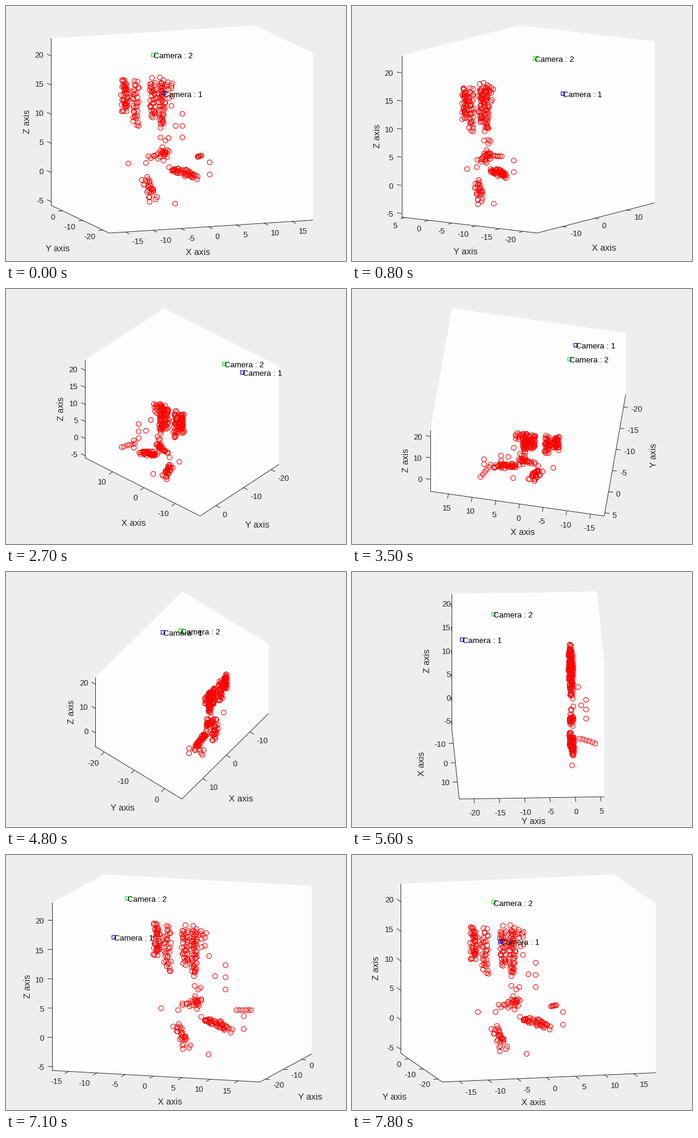
Animation of 560 by 420 pixels, one loop 7900 ms. Source, as a matplotlib script:

```python
import numpy as np
import matplotlib.pyplot as plt
from matplotlib.animation import FuncAnimation

W, H, DPI = 560, 420, 100
FRAMES, INTERVAL = 79, 100
PT = 72 / DPI  # points per pixel
INK = "#262626"
CENTER = np.array([290, 202.9])

plt.rcParams["font.family"] = "Liberation Sans"

# Box limits, rows are x, y, z
LIMITS = np.array([[-17.9, 18.8], [-22.9, 5.75], [-5.65, 23.05]])
MID = LIMITS.mean(axis=1)
SPAN = np.ptp(LIMITS, axis=1)

# View path: azimuth and elevation at evenly spaced keys
AZIMUTH = [-20, -110, -190, -290, -380]
ELEVATION = [10, 10, 80, 10, 10]

CAMERAS = [
    ("Camera : 1", "#0000ff", (-7.58, -21.3, 17.5)),
    ("Camera : 2", "#00f000", (-7.18, -15.13, 23.05)),
]


def make_cloud():
    """A flat figure of scattered strokes, with a few points out of plane."""
    rng = np.random.default_rng(5)
    parts = []

    def stroke(n, a, b, spread):
        # Points scattered along a segment in the x-z plane
        t = (np.arange(n) + rng.uniform(size=n))[:, None] / n
        xz = np.array(a) + t * np.subtract(b, a)
        xz += rng.uniform(-spread, spread, (n, 2))
        y = rng.uniform(-.4, .3, n)
        parts.append(np.column_stack([xz[:, 0], y, xz[:, 1]]))

    def row(n, a, b):
        parts.append(np.linspace(a, b, n))

    # Upper block: four columns and a loose right edge
    for x, low, n in ((-6.8, 11, 46), (-4.9, 8.3, 34),
                      (-1.8, 9.6, 34), (-.2, 8, 50)):
        stroke(n, (x, 16), (x, low), .55)
    stroke(9, (1, 16), (1.8, 13), .6)

    # Neck, shoulder, arm and foot
    stroke(8, (.3, 6.6), (.3, 2), .7)
    stroke(20, (-1.9, 2.9), (1.2, 3.3), .6)
    stroke(46, (1.4, .6), (5.9, -1.2), .6)
    stroke(28, (-3.4, -.8), (-1.4, -4.4), .8)

    # Loose points, some standing in front of the plane
    row(3, (4.5, 2.6, 9.3), (4.5, 2.6, 5.2))
    row(2, (2, 1.2, 11), (3, 1.7, 7.5))
    row(6, (6.8, 1.4, 2), (8.5, 4.3, 1.6))
    row(2, (8.5, 0, 1.2), (8.5, 0, -.9))
    row(2, (-6.1, 0, 1.8), (-3, 0, 1.7))
    row(1, (2.3, 0, -5.6), (2.3, 0, -5.6))
    return np.vstack(parts)


CLOUD = make_cloud()


class View:
    """Orthographic camera that fits the box into the plot area."""

    def __init__(self, az, el):
        az, el = np.radians([az, el])
        ca, sa, ce, se = np.cos(az), np.sin(az), np.cos(el), np.sin(el)
        self.basis = np.array([[ca, sa, 0], [-sa * se, ca * se, ce]])
        width, height = np.abs(self.basis) @ SPAN
        self.scale = min(434 / width, 342 / height)
        # Nearest floor corner
        self.front = np.array([LIMITS[0, int(sa > 0)],
                               LIMITS[1, int(ca < 0)], LIMITS[2, 0]])

    def __call__(self, p):
        flat = (np.asarray(p, float) - MID) @ self.basis.T * self.scale
        return flat * (1, -1) + CENTER


def opposite(corner, k):
    out = corner.copy()
    out[k] = LIMITS[k].sum() - corner[k]
    return out


def tick_step(edge, span):
    dx, dy = np.abs(edge) / span
    if dx * 5 > 37 or dy * 5 > 23:
        return 5
    return 10 if dx * 10 > 20 or dy * 10 > 15 else 20


fig = plt.figure(figsize=(W / DPI, H / DPI), dpi=DPI, facecolor="#eeeeee")
ax = fig.add_axes([0, 0, 1, 1])


def text(x, y, s, px=13.1, ha="center", rot=0, color=INK):
    # Optical centring: shift along the glyphs' down direction
    x, y = (x + 1.2, y) if rot else (x, y + 1.2)
    ax.text(x, y, s, fontsize=px * PT, ha=ha, va="center", rotation=rot,
            rotation_mode="default", color=color, zorder=5)


def line(a, b):
    ax.plot([a[0], b[0]], [a[1], b[1]], color=INK, lw=.9 * PT, zorder=2,
            solid_capstyle="butt")


def draw_axis(view, k, start, out):
    """Axis k from a corner with ticks along `out`; returns middle and size."""
    a, b = view(start), view(opposite(start, k))
    line(a, b)
    edge = b - a
    d = out / max(np.hypot(*out), 1e-6)
    if k == 2:
        shift, ha = d * (13.5, 8) + (0, 2), "right"
    else:
        drop = 10.5 * abs(edge[0]) / np.hypot(*edge)
        shift = d * (12.5, 13) + (0, drop)
        ha = "left" if d[0] > .3 else "right" if d[0] < -.3 else "center"
    step = tick_step(edge, SPAN[k])
    lo, hi = LIMITS[k]
    for v in range(int(np.ceil(lo / step)) * step, int(hi) + 1, step):
        p = start.copy()
        p[k] = v
        at = view(p)
        line(at, at + d * 7.5)
        text(*(at + shift), f"{v:d}", ha=ha)
    return (a + b) / 2, np.abs(edge)


def draw_floor_title(name, mid, size):
    w, h = size
    side = np.clip((mid[0] - CENTER[0]) / 6, -1, 1)
    if h > 2 * w:
        text(mid[0] + side * (48 + .075 * h), mid[1], name, 14.67, rot=90)
    else:
        text(mid[0] + side * (61 - .245 * w), mid[1] + 37 + .228 * h,
             name, 14.67)


def draw(n):
    ax.cla()
    ax.set_xlim(0, W)
    ax.set_ylim(H, 0)
    ax.axis("off")

    turn = max(0, .0505 * n - .005)
    view = View(np.interp(turn, range(5), AZIMUTH),
                np.interp(turn, range(5), ELEVATION))
    front = view.front

    # Floor axes that leave the front corner to the left and to the right
    kl, kr = sorted((0, 1), key=lambda k: view(opposite(front, k))[0])
    left, right = opposite(front, kl), opposite(front, kr)
    back = opposite(left, kr)
    hull = [front, right, opposite(right, 2), opposite(back, 2),
            opposite(left, 2), left]
    ax.fill(*view(hull).T, color="#fdfdfd", lw=0, zorder=1)

    to_left = view(left) - view(front)
    to_right = view(right) - view(front)
    for k, out in ((kl, -to_right), (kr, -to_left)):
        draw_floor_title("XY"[k] + " axis", *draw_axis(view, k, front, out))
    mid, _ = draw_axis(view, 2, left, to_left)
    text(mid[0] - 41, mid[1], "Z axis", 14.67, rot=90)

    ax.plot(*view(CLOUD).T, "o", ms=8 * PT, mfc="none", mec="#ff0000",
            mew=PT, zorder=3)
    for name, color, place in CAMERAS:
        x, y = view(place)
        ax.plot(x, y, "s", ms=6 * PT, mfc="none", mec=color, mew=1.1 * PT,
                zorder=4)
        text(x + .5, y + 2, name, ha="left", color="black")
    return []


anim = FuncAnimation(fig, draw, frames=FRAMES, interval=INTERVAL,
                     init_func=lambda: [], repeat=True, repeat_delay=0)
plt.show()
```
